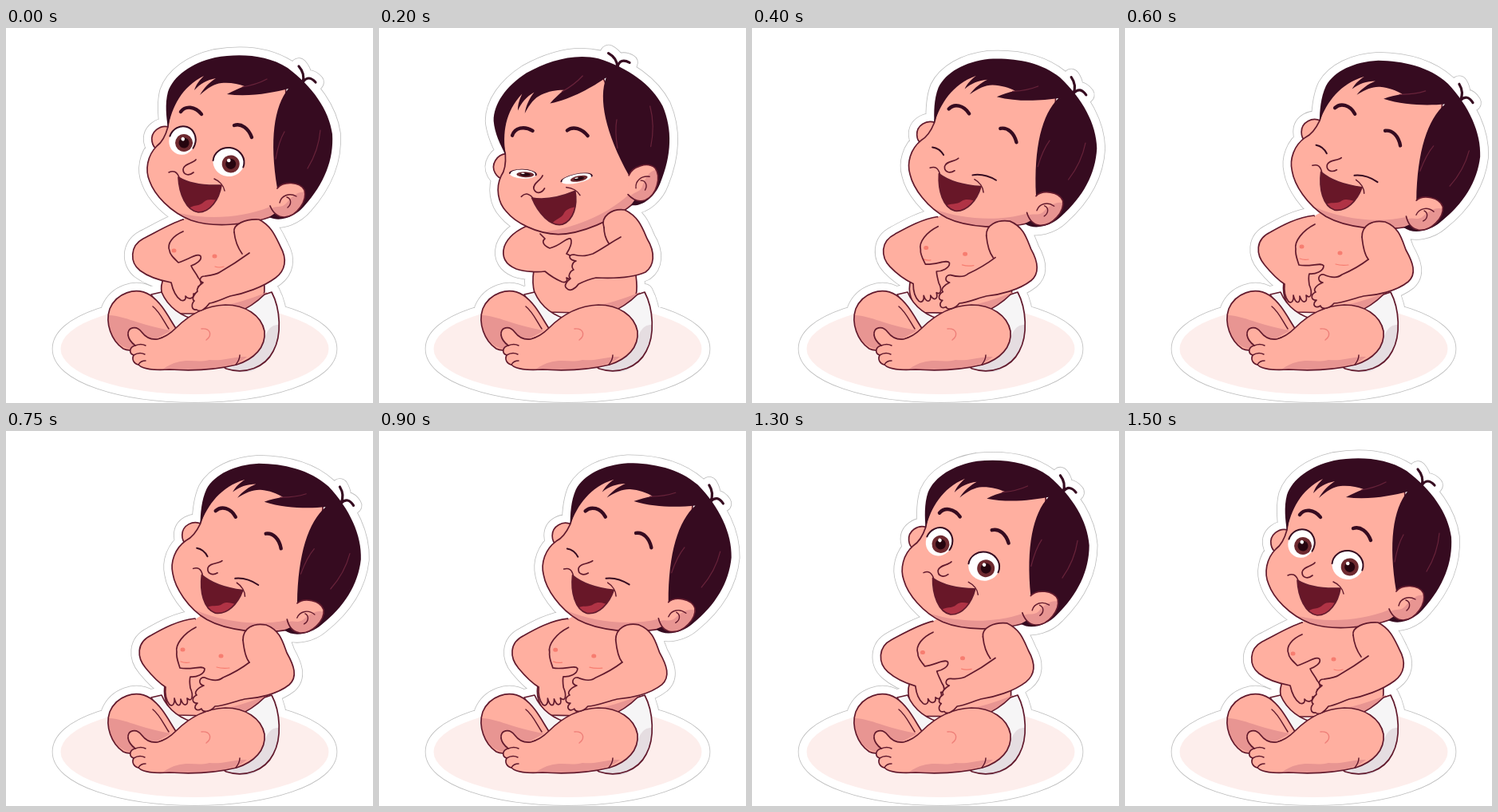
An HTML page with a canvas for the animation above (1550 ms loop, 460 px wide and 470 px high).

```html
<!DOCTYPE html>
<html lang="en">
<head>
<meta charset="utf-8">
<title>Laughing baby</title>
<style>
html, body { margin: 0; width: 100%; height: 100%; overflow: hidden; background: #fff; }
canvas { display: block; }
</style>
</head>
<body>
<canvas id="stage" width="460" height="470"></canvas>
<script>
const ctx = document.getElementById('stage').getContext('2d');
const LOOP = 1550, STEP = 50;
const SKIN = '#ffafa0', SHADE = '#e89592', LINE = '#621a2d', HAIR = '#360b20', MARK = '#f77d70';
const path = d => new Path2D(d);

// Lean of the head in degrees and openness of the eyes, as [time, value].
const LEAN = [[0, 0], [200, -19.5], [400, 6.5], [600, 10.2], [650, 10.6], [900, 9.2], [1100, 11.5], [1300, 3.8], [1500, 0], [LOOP, 0]];
const EYES = [[0, 1], [100, .85], [200, .32], [270, 0], [1150, 0], [1250, 1], [LOOP, 1]];

// Monotone cubic through the keys.
function sample(keys, t) {
  const slope = i => i < 0 || i > keys.length - 2 ? 0 :
    (keys[i + 1][1] - keys[i][1]) / (keys[i + 1][0] - keys[i][0]);
  const tangent = i => {
    const a = slope(i - 1), b = slope(i);
    return a * b > 0 ? 2 * a * b / (a + b) : 0;
  };
  let i = 0;
  while (i < keys.length - 2 && t >= keys[i + 1][0]) i++;
  const [t0, v0] = keys[i], [t1, v1] = keys[i + 1];
  const h = t1 - t0, p = (t - t0) / h, q = 1 - p;
  return v0 * q * q * (1 + 2 * p) + v1 * p * p * (3 - 2 * p) + h * p * q * (q * tangent(i) - p * tangent(i + 1));
}

// Head, drawn upright in its rest pose.
const head = {
  face: path('M203 124C200 135 196 143 189 148C177 160 174 178 180 192C186 209 206 231 232 241C258 250 302 248 337 235L360 200L350 70L300 50C250 45 207 72 203 124Z'),
  chin: path('M217 232C250 240 295 239 331 224L338 235C300 248 258 250 232 241Z'),
  earL: path('M204 124C193 121 181 130 183 142C184 148 187 151 190 152L203 140Z'),
  earR: path('M340 201C347 192 368 192 374 203C378 216 365 236 349 237C340 237 334 230 331 223'),
  earShade: path('M333 226C341 222 345 226 351 220C358 211 366 204 375 206C376 222 362 237 348 237C340 237 335 232 333 226Z'),
  earFold: path('M343 219C345 210 355 206 364 211M352 212C358 214 358 221 353 225'),
  hair: path('M203 125C208 99 220 74 248 60C243 65 238 71 236 78C243 70 252 65 263 63C255 68 248 75 243 84C253 75 261 70 270 69C281 68 291 70 299 73C291 76 284 79 277 83C305 87 335 81 354 76C336 98 330 140 340 201L352 222L330 237C345 245 365 234 374 223C399 195 411 165 409 133C405 103 384 73 353 50C326 33 292 32 262 37C232 44 210 60 203 80C199 95 201 112 203 125Z'),
  streaks: path('M296 74Q314 71 327 64M394 128Q392 153 378 176M338 164Q342 142 349 130'),
  tuft: path('M372 68Q375 57 367 48M372 68Q379 58 388 68'),
  brows: path('M219 105C225 97 237 98 245 108M286 122C295 119 304 126 308 137'),
  nose: path('M238 165C234 170 223 170 222 177C222 184 229 186 235 181'),
  mouth: path('M216 187C231 196 250 198 270 197C267 215 256 231 241 231C226 229 217 208 216 187Z'),
  tongue: path('M228 227C234 221 243 224 248 218C254 213 262 216 268 216L258 236L235 236Z'),
  smile: path('M204 181C210 178 214 180 217 187M261 189C268 192 273 198 274 204'),
  closed: path('M204 155Q213 155 219 163M258 184Q272 180 288 187')
};

// Body parts as three poses: rest, leaning left, leaning right.
const POSES = {
  torso: [
    'M222 240C200 255 190 290 196 318C192 330 197 345 210 358L305 358C328 345 325 325 322 310C320 290 318 270 312 246L290 225L240 228',
    'M190 248C180 262 190 290 194 304C191 322 194 340 208 356L305 358C326 345 324 325 322 310C316 290 312 270 305 240L280 220L220 225',
    'M237 236C208 250 196 290 200 315C196 330 200 345 212 356L305 358C330 345 328 330 324 315C322 290 318 270 318 250L310 232L255 225'],
  armL: [
    'M222 240C206 245 188 256 172 264C155 273 155 294 168 304C180 313 196 317 207 319C209 328 213 337 219 341C223 343 226 340 225 336C229 341 236 339 235 333C240 334 244 329 241 324C246 322 245 317 241 313C238 307 234 303 232 298C238 296 246 291 244 286C241 281 229 290 216 294C209 287 205 283 205 279C201 270 210 260 222 255',
    'M190 246C175 252 162 260 157 274C153 288 160 297 172 302C184 306 200 306 208 305C214 310 222 315 229 318C234 320 237 317 235 313C241 317 246 312 243 308C249 309 252 304 249 300C252 298 250 294 246 291C242 287 238 284 235 283C239 277 243 268 240 264C235 262 228 273 214 276C207 273 203 268 208 264C206 262 204 260 202 258',
    'M237 235C216 237 196 248 182 256C163 265 164 284 175 297C184 308 192 316 200 321C199 330 201 338 205 343C209 346 212 341 211 335C214 347 220 346 219 336C223 347 229 344 227 335C234 341 235 331 231 322C230 315 230 311 231 308C238 309 249 305 249 298C246 293 232 300 218 297C216 290 213 284 214 277C212 268 222 254 238 246'],
  armR: [
    'M286 256C284 246 300 239 317 240C333 248 338 262 344 274C353 290 350 304 338 313C322 325 298 333 281 336C270 340 262 344 255 345C250 352 243 357 239 353C232 354 232 346 236 342C232 340 236 333 240 330C238 326 243 322 247 319C241 318 243 311 249 311C256 310 264 309 268 306C282 298 294 290 305 282',
    'M282 250C277 236 292 226 308 228C325 236 330 250 336 264C347 282 345 298 334 306C316 314 292 314 272 313C262 315 256 318 250 321C246 327 239 331 235 326C231 323 236 317 240 314C236 311 240 304 244 303C240 299 243 293 247 292C238 291 236 284 244 284C256 287 262 285 268 283C281 276 292 268 303 262',
    'M297 262C297 247 310 240 326 243C344 250 347 265 352 278C361 294 366 308 355 318C340 330 316 335 299 336C286 339 272 345 262 345C257 351 247 354 245 348C238 353 234 346 240 341C233 342 232 334 239 331C235 328 240 322 248 319C240 318 242 308 249 309C258 313 266 314 272 309C286 303 296 297 305 290'],
  armpit: [
    'M286 256C287 266 291 276 296 283',
    'M282 250C282 256 284 264 288 270',
    'M297 262C298 272 300 284 305 290'],
  nipples: [
    'M210 279h1M261 286h1',
    'M200 284h1M262 296h1',
    'M221 274h1M269 282h1'],
  creases: [
    'M206 292Q208 293 210 293M262 299Q267 301 273 299',
    'M200 292Q204 293 206 293M262 300Q267 301 273 300',
    'M219 289Q224 291 230 290M264 296Q271 298 280 297']
};

const legs = {
  diaper: path('M182 334L195 331C203 350 220 362 240 366C275 368 306 352 324 334L333 331C344 352 346 385 335 405C325 425 300 435 276 427L205 380Z'),
  diaperShade: path('M342 372C345 396 331 420 308 430C296 433 284 430 276 427C300 422 318 405 324 388C330 373 336 372 342 372Z'),
  left: path('M214 378C205 365 196 345 181 335C162 323 138 333 130 352C124 370 132 392 147 402C153 405 160 404 166 401L205 384'),
  leftShade: path('M129 360C150 361 166 372 207 379L166 402C150 406 126 392 129 360Z'),
  right: path('M190 390C182 391 176 389 170 381C163 372 152 375 153 385C154 391 158 395 162 398C154 400 154 408 160 410C157 416 161 421 166 422C172 428 185 429 205 428C235 430 265 428 289 422C311 415 326 400 324 380C320 360 300 347 275 347C247 348 228 361 213 376C206 383 198 388 190 390'),
  rightShade: path('M196 428C222 410 236 421 255 416C272 418 286 411 302 412C290 423 262 429 230 429Z'),
  creases: path('M184 349C192 355 197 366 204 377M162 398C167 396 171 396 175 398M160 410C165 407 170 407 174 409M166 422C168 418 172 417 175 417M288 422C292 417 293 413 293 410'),
  knee: path('M245 377C255 376 260 384 251 391')
};
const belly = path('M255 351C285 347 308 339 327 331L322 350L290 360Z');

const ground = grow => {
  const p = new Path2D();
  p.ellipse(236.5, 402, 168 + grow, 57 + grow, 0, 0, 7);
  return p;
};

function blend(name, left, right) {
  const [rest, l, r] = POSES[name].map(d => d.match(/\d+/g).map(Number));
  let i = 0;
  return path(POSES[name][0].replace(/\d+/g, () => {
    const n = rest[i] + left * (l[i] - rest[i]) + right * (r[i] - rest[i]);
    i++;
    return n.toFixed(2);
  }));
}

function fill(shape, color) {
  ctx.fillStyle = color;
  ctx.fill(shape);
}

function stroke(shape, width = 1.7, color = LINE) {
  ctx.lineWidth = width;
  ctx.strokeStyle = color;
  ctx.stroke(shape);
}

function limb(shape, color = SKIN, shade, shadeColor = SHADE) {
  fill(shape, color);
  if (shade) fill(shade, shadeColor);
  stroke(shape);
}

function clipped(shape, draw) {
  ctx.save();
  ctx.clip(shape);
  draw();
  ctx.restore();
}

function disc(x, y, r, color) {
  const p = new Path2D();
  p.arc(x, y, r, 0, 7);
  fill(p, color);
}

function drawEye(x, y, rx, angle, open) {
  const white = new Path2D(), lash = new Path2D();
  white.ellipse(0, 0, rx, 18, 0, 0, 7);
  lash.ellipse(0, 0, rx, 18, 0, 3.1, 6.5);
  ctx.save();
  ctx.translate(x, y);
  ctx.rotate(angle);
  ctx.translate(0, 22);
  ctx.scale(1, open);
  ctx.translate(0, -22);
  fill(white, '#fff');
  clipped(white, () => {
    disc(3, 2, 11, '#6e2a30');
    disc(3, 2, 6.5, '#26050f');
    disc(0, -2, 2.3, '#fff');
  });
  stroke(lash, 2, HAIR);
  ctx.restore();
}

function drawHead(open) {
  limb(head.earL);
  fill(head.face, SKIN);
  fill(head.chin, SHADE);
  stroke(head.face);
  fill(head.hair, HAIR);
  stroke(head.tuft, 3.2, HAIR);
  stroke(head.streaks, 1.2, '#68233a');
  limb(head.earR, SKIN, head.earShade);
  stroke(head.earFold, 1.4);
  if (open > .08) {
    drawEye(221, 141, 16.5, .38, open);
    drawEye(279, 168, 19.5, .14, open);
  } else stroke(head.closed, 2, HAIR);
  stroke(head.brows, 4.4, HAIR);
  stroke(head.nose);
  fill(head.mouth, '#681728');
  clipped(head.mouth, () => fill(head.tongue, '#b03345'));
  stroke(head.mouth);
  stroke(head.smile, 1.5);
}

function draw(t) {
  const lean = sample(LEAN, t), left = Math.max(0, -lean) / 19.5, right = Math.max(0, lean) / 10.2;
  const reach = Math.min(1, right), bend = reach * reach * (3 - 2 * reach);
  const body = {};
  for (const name in POSES) body[name] = blend(name, left, bend);

  // The head turns about the ear on the right.
  const turn = new DOMMatrix()
    .translate(355 - 23 * left + 22.5 * right, 215 - 22 * left + 17.5 * right)
    .rotate(lean).translate(-355, -215);

  const sticker = ground(0);
  for (const p of [body.torso, body.armL, body.armR, legs.diaper, legs.left, legs.right]) sticker.addPath(p);
  for (const p of [head.face, head.hair, head.earL, head.earR, head.tuft]) sticker.addPath(p, turn);

  ctx.fillStyle = '#fff';
  ctx.fillRect(0, 0, 460, 470);
  ctx.lineCap = ctx.lineJoin = 'round';
  stroke(sticker, 21.6, '#bdbdbd');
  stroke(sticker, 20, '#fff');
  fill(sticker, '#fff');
  fill(ground(0), '#fdeeec');

  limb(body.torso);
  fill(belly, SHADE);
  stroke(body.nipples, 5, MARK);
  stroke(body.creases, 1.2, MARK);
  limb(legs.diaper, '#f6f5f6', legs.diaperShade, '#e5dde1');
  limb(legs.left, SKIN, legs.leftShade);
  limb(legs.right, SKIN, legs.rightShade);
  stroke(legs.creases, 1.5);
  stroke(legs.knee, 1.4, '#ee7f78');
  limb(body.armL);

  ctx.save();
  ctx.transform(turn.a, turn.b, turn.c, turn.d, turn.e, turn.f);
  drawHead(sample(EYES, t));
  ctx.restore();

  limb(body.armR);
  stroke(body.armpit);
}

const start = performance.now();
function tick() {
  const t = (performance.now() - start) % LOOP;
  draw(Math.floor(t / STEP) * STEP);
  requestAnimationFrame(tick);
}
tick();
</script>
</body>
</html>
```
